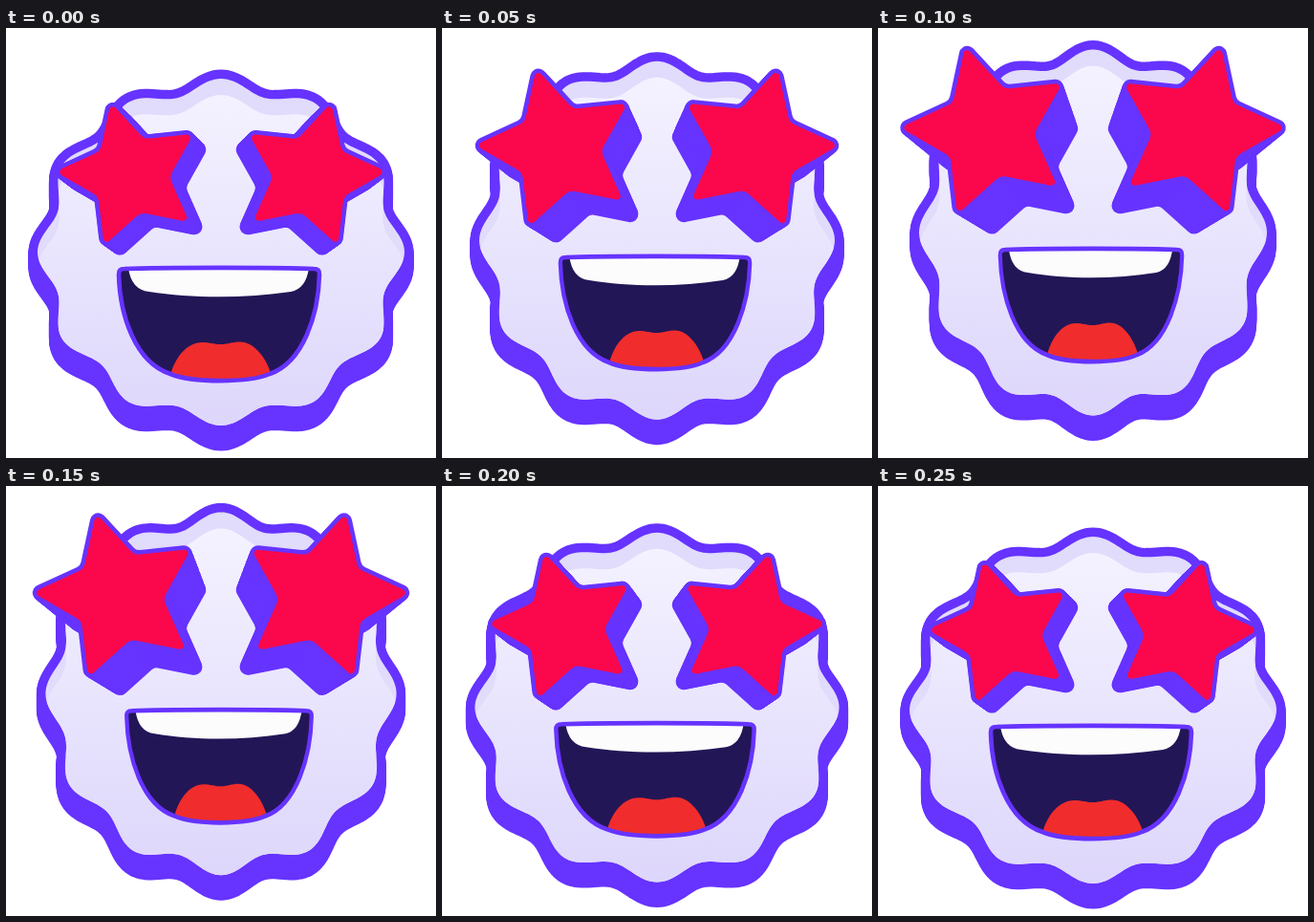
Write an HTML page with a canvas that moves like this. It is 450 px wide and 450 px high and loops after 300 ms.

```html
<!DOCTYPE html>
<html lang="en">
<head>
<meta charset="utf-8">
<title>Star-eyed face</title>
<style>
  html, body { margin: 0; width: 100%; height: 100%; overflow: hidden; background: #fff; }
  canvas { display: block; width: 450px; height: 450px; }
</style>
</head>
<body>
<canvas id="stage" width="450" height="450"></canvas>
<script>
const ctx = document.getElementById('stage').getContext('2d');
const PURPLE = '#6633ff', RED = '#fa074c';
const STEP = 50;
const LIFT = [0, 0.6, 1, 0.84, 0.14, 0];   // how far the face is popped up per step
const DEG = Math.PI / 180;

const MOUTH = new Path2D('M118 258Q117.500 252 124 252C160 250.500 290 250.500 322 252Q328.500 252 328 258' +
  'C327 300 311 350 276 362C254 371.500 195 371.500 172 362C135 350 119 300 118 258Z');
const TEETH = new Path2D('M128 251Q131 274 150 276C195 283 250 283 298 276Q314 273 317 251Z');
const TONGUE = new Path2D('M172 364C176 346 189 329 205 329C214 329 217 331 225 331' +
  'C233 331 236 328.500 245 328.500C260 328.500 273 346 278 364V375H172Z');

const mix = (a, b, p) => a + (b - a) * p;

function paint(path, color, width) {
  ctx.fillStyle = ctx.strokeStyle = color;
  ctx.lineWidth = width;
  ctx.fill(path);
  ctx.stroke(path);
}

// Round badge with twelve soft lobes
function badge(cy, rx, ry) {
  const path = new Path2D();
  for (let i = 0; i < 360; i++) {
    const a = i * DEG;
    const r = 0.96 + 0.04 * Math.cos(12 * a);
    path.lineTo(225 + rx * r * Math.sin(a), cy - ry * r * Math.cos(a));
  }
  path.closePath();
  return path;
}

function drawHead(p) {
  const cy = mix(234.5, 214, p), rx = mix(192, 182, p), ry = mix(181.5, 191.5, p);
  const shape = badge(cy, rx, ry);
  for (let d = 0; d <= 17; d++) {
    ctx.save();
    ctx.translate(0, d);
    paint(shape, PURPLE, 19);
    ctx.restore();
  }
  const shade = ctx.createLinearGradient(0, cy - ry, 0, cy + ry);
  shade.addColorStop(0, '#f4f2ff');
  shade.addColorStop(1, '#dcd5fb');
  ctx.save();
  ctx.clip(shape);
  ctx.fillStyle = '#e1dbfc';
  ctx.fillRect(0, 0, 450, 450);
  ctx.translate(0, 17);
  ctx.fillStyle = shade;
  ctx.fill(shape);
  ctx.restore();
}

function drawMouth(p) {
  ctx.save();
  ctx.translate(223, -20 * p);
  ctx.scale(1 - 0.093 * p, 1);
  ctx.translate(-223, 0);
  ctx.fillStyle = '#231656';
  ctx.fill(MOUTH);
  ctx.save();
  ctx.clip(MOUTH);
  ctx.fillStyle = '#fcfcfc';
  ctx.fill(TEETH);
  ctx.fillStyle = '#f02c2c';
  ctx.fill(TONGUE);
  ctx.restore();
  ctx.strokeStyle = PURPLE;
  ctx.lineWidth = 4.6;
  ctx.stroke(MOUTH);
  ctx.restore();
}

// Five-pointed star, slightly tilted, with rounded notches
function star(cx, cy, size) {
  const at = i => {
    const a = (36 * i - 105.3) * DEG, r = i % 2 ? size * 0.515 : size;
    return [cx + r * Math.cos(a), cy + r * Math.sin(a)];
  };
  const path = new Path2D();
  for (let i = 0; i < 10; i++) {
    if (i % 2) path.arcTo(...at(i), ...at(i + 1), 16);
    else path.lineTo(...at(i));
  }
  path.closePath();
  return path;
}

function drawStar(p) {
  const x = mix(130.4, 115.6, p), y = mix(154, 108.4, p), size = mix(70, 84, p);
  for (let k = 0; k <= 1; k += 1 / 32) {
    paint(star(mix(143.5, x, k), mix(165 - 22 * p, y, k), mix(68.5, size, k)), PURPLE, 17);
  }
  paint(star(x, y, size), RED, 8);
}

function draw(p) {
  ctx.fillStyle = '#fff';
  ctx.fillRect(0, 0, 450, 450);
  ctx.lineJoin = 'round';
  drawHead(p);
  drawMouth(p);
  drawStar(p);
  ctx.save();
  ctx.translate(450, 0);
  ctx.scale(-1, 1);
  drawStar(p);
  ctx.restore();
}

let shown = -1;
const start = performance.now();
function tick(now) {
  const step = Math.floor(Math.max(0, now - start) / STEP) % LIFT.length;
  if (step !== shown) draw(LIFT[shown = step]);
  requestAnimationFrame(tick);
}
tick(start);
</script>
</body>
</html>
```
